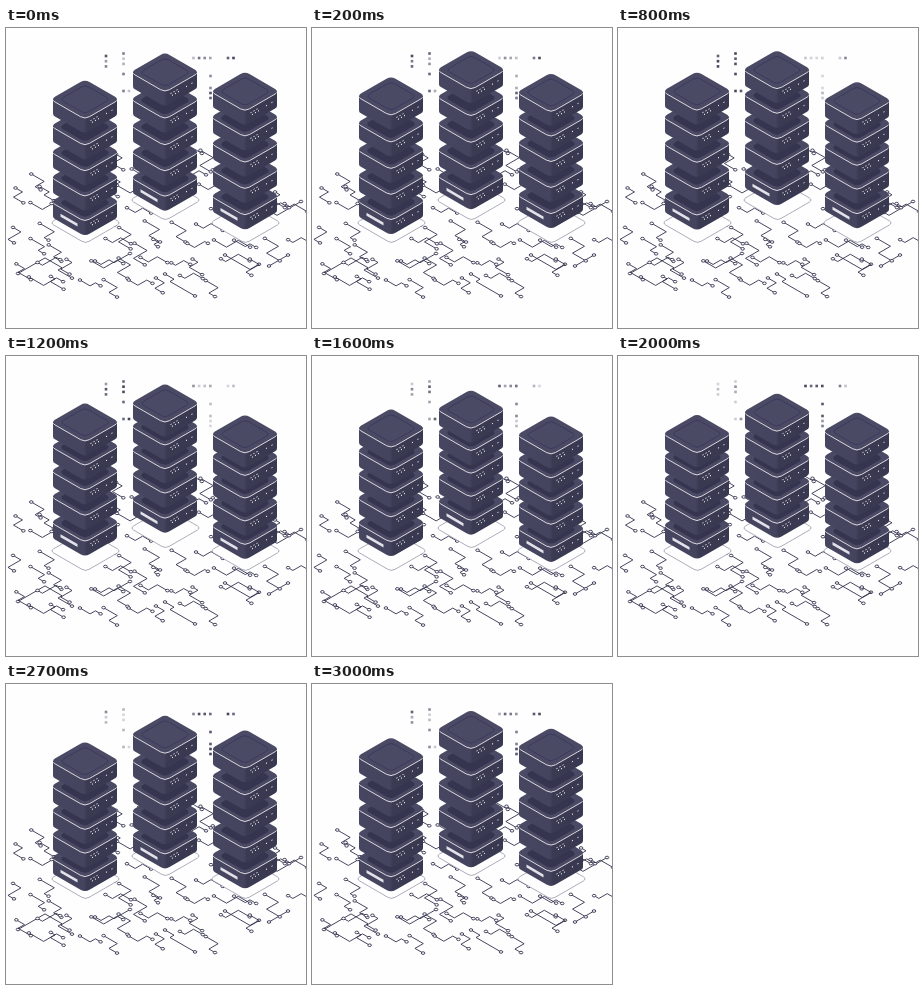
An HTML page with a canvas that plays this animation: 300 by 300 pixels, repeating every 3.1 s.

```html
<!DOCTYPE html>
<html lang="en">
<head>
<meta charset="utf-8">
<title>Server towers</title>
<style>
html, body { margin: 0; width: 100%; height: 100%; overflow: hidden; background: #fefeff; }
canvas { display: block; width: 300px; height: 300px; }
</style>
</head>
<body>
<canvas></canvas>
<script>
const LOOP = 3100, STEP = 100, SLOPE = 0.577, SIDE = 14.5, GAP = 24.7;
const INK = '#33324c', PAPER = '#fefeff';
const canvas = document.querySelector('canvas');
const ctx = canvas.getContext('2d');
const ratio = Math.max(1, devicePixelRatio || 1);
canvas.width = canvas.height = 300 * ratio;
ctx.scale(ratio, ratio);

const towers = [
  { x: 159, y: 48.5, lowest: 2050 },
  { x: 79, y: 71.4, lowest: 2320 },
  { x: 239, y: 71.4, lowest: 1480 }
];

let seed = 11;
function random(min, max) {
  seed = seed * 16807 % 2147483647;
  return min + (max - min) * seed / 2147483647;
}

const wave = (t, peak) => Math.cos((t - peak) / LOOP * 2 * Math.PI);
const baseY = tower => tower.y + 123.5;

// A trace is a start point and horizontal runs, alternately falling and rising.
function makeTraces() {
  const traces = [
    [12, 245.5, 0, 27, 17, -4, 14],
    [89, 233, 6, 8, 5, 16],
    [159, 246, 9, -4, 25],
    [219, 227, 25, 9],
    [263, 238, 0, 19],
    [295, 173.5, 0, -24, -5]
  ];
  const onBase = (x, y) => towers.some(tower =>
    Math.abs(x - tower.x) / 36 + Math.abs(y - baseY(tower)) / 21 < 1.1);
  for (let row = 0; row < 8; row++) {
    for (let x = 8 + row % 2 * 13; x < 285; x += 26) {
      const startX = x + random(-5, 5), startY = 124 + row * 18 + random(-4, 4);
      const turn = random(0, 1) < 0.5 ? -1 : 1;
      const runs = [random(4, 15), turn * random(4, 14), random(3, 14)];
      const inField = startY > 105 + Math.abs(startX - 150) * 0.32
        && startY < 262 - Math.max(0, startX - 190) * 0.45;
      if (inField && !onBase(startX, startY)) traces.push([startX, startY, ...runs]);
    }
  }
  return traces;
}

// Rounded square lying flat in isometric space.
function tile(x, y, size, radius) {
  const flat = new Path2D(), path = new Path2D();
  flat.roundRect(-size / 2, -size / 2, size, size, radius);
  path.addPath(flat, new DOMMatrix([1, SLOPE, -1, SLOPE, x, y]));
  return path;
}

function outline(path, color, width) {
  ctx.strokeStyle = color;
  ctx.lineWidth = width;
  ctx.stroke(path);
}

function fill(path, color) {
  ctx.fillStyle = color;
  ctx.fill(path);
}

function dot(x, y) {
  ctx.beginPath();
  ctx.arc(x, y, 0.6, 0, 7);
  ctx.fill();
}

function drawTrace([x, y, ...runs]) {
  const line = new Path2D(), ends = [[x, y]];
  line.moveTo(x, y);
  runs.forEach((run, i) => {
    x += run;
    y += run * (i % 2 ? -SLOPE : SLOPE);
    line.lineTo(x, y);
  });
  ends.push([x, y]);
  outline(line, INK, 0.9);
  for (const [endX, endY] of ends) {
    const ring = new Path2D();
    ring.ellipse(endX, endY, 1.8, 1.3, 0, 0, 7);
    fill(ring, PAPER);
    outline(ring, INK, 0.9);
  }
}

// Draws on a wall: x runs along it from the front corner, y down from its top edge.
function onWall(x, y, slope, paint) {
  ctx.save();
  ctx.transform(1, slope, 0, 1, x, y + 20);
  paint();
  ctx.restore();
}

function drawBox(x, y, level) {
  const top = tile(x, y, 34.6, 4.5);
  const walls = ctx.createLinearGradient(x - 32, 0, x + 32, 0);
  walls.addColorStop(0, '#474660');
  walls.addColorStop(0.48, '#45445e');
  walls.addColorStop(0.53, '#3b3a53');
  walls.addColorStop(1, '#393851');
  fill(tile(x, y + SIDE, 34.6, 4.5), walls);
  ctx.fillRect(x - 32, y, 64, SIDE);
  fill(top, '#4b4a65');
  if (level) fill(tile(x, y + 1, 26, 4), '#363550');
  else outline(tile(x, y, 25, 3.5), '#34335a', 0.7);

  ctx.save();
  ctx.beginPath();
  ctx.rect(x - 34, y + 1, 68, 30);
  ctx.clip();
  outline(top, '#fff', 0.8);
  ctx.restore();

  onWall(x, y, -SLOPE, () => {
    ctx.fillStyle = '#fff';
    for (let i = 0; i < 3; i++) {
      dot(6 + i * 3, 4.5);
      dot(7.5 + i * 3, 7.2);
    }
    dot(21.5, 6.5);
    dot(27, 6.5);
  });
  if (level === 4) {
    onWall(x, y, SLOPE, () => {
      ctx.fillStyle = '#e2e2ea';
      ctx.fillRect(-24.5, 6, 17, 3);
    });
  }
}

// A run of blinking squares, lit in turn as a sweep passes from left to right.
function drawLights(t, x, y, dx, dy, count) {
  ctx.fillStyle = INK;
  for (let i = 0; i < count; i++) {
    const peak = 600 + (x - 100) * 19 + (i * 7 % 4 - 1.5) * 170;
    ctx.globalAlpha = 0.55 + 0.35 * wave(t, peak);
    ctx.fillRect(x + i * dx - 1.3, y + i * dy - 1.3, 2.6, 2.6);
  }
  ctx.globalAlpha = 1;
}

const traces = makeTraces();

function draw(t) {
  ctx.fillStyle = PAPER;
  ctx.fillRect(0, 0, 300, 300);
  traces.forEach(drawTrace);

  drawLights(t, 100, 28, 0, 5.2, 3);
  drawLights(t, 117.5, 25.5, 0, 5.2, 3);
  drawLights(t, 117.5, 46, 0, 0, 1);
  drawLights(t, 117.5, 63, 5.5, 0, 2);
  drawLights(t, 187.5, 30, 5.6, 0, 4);
  drawLights(t, 222, 30, 5.5, 0, 2);
  drawLights(t, 204.5, 48, 0, 0, 1);
  drawLights(t, 204.5, 60, 0, 5, 3);

  for (const tower of towers) {
    const base = tile(tower.x + 0.5, baseY(tower), 35.5, 3.5);
    fill(base, PAPER);
    outline(base, '#77768c', 0.6);
    for (let level = 4; level >= 0; level--) {
      const bob = (8 - level) * wave(t, tower.lowest + level * 140);
      drawBox(tower.x, tower.y + level * GAP + bob, level);
    }
  }
}

function tick() {
  draw(Math.floor(performance.now() % LOOP / STEP) * STEP);
  requestAnimationFrame(tick);
}
tick();
</script>
</body>
</html>
```
